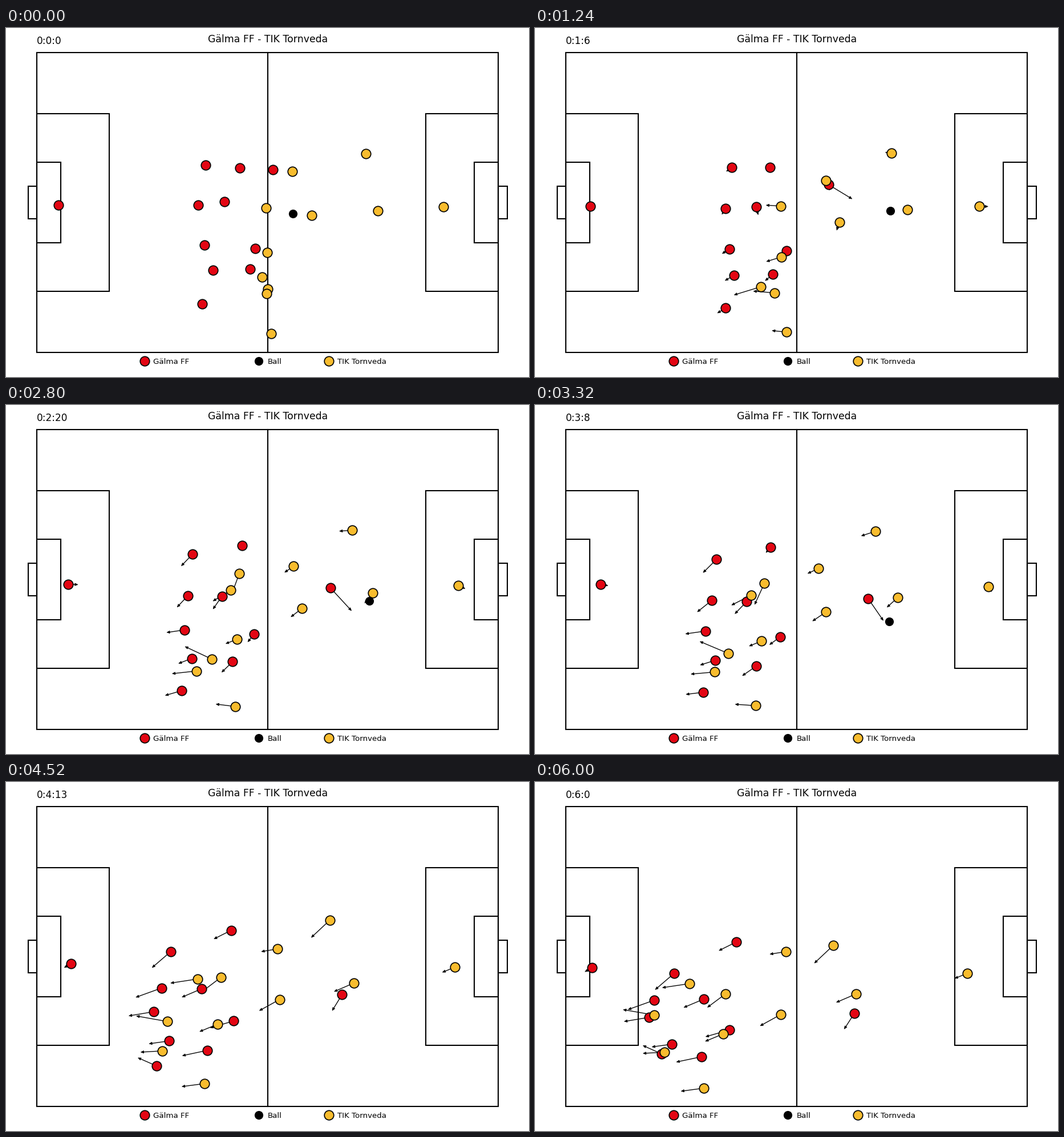
A matplotlib script that plays this animation: 917x611 px, repeating every 6.04 s.

```python
import numpy as np
import matplotlib.pyplot as plt
from matplotlib.animation import FuncAnimation
from matplotlib.collections import LineCollection, PolyCollection
from matplotlib.patches import Rectangle

W, H, DPI = 917, 611, 64
PX = 72 / DPI                      # one pixel in points
FPS, FRAMES = 25, 151
HEAD = 5.5                         # arrow head length
HOME, AWAY = "Gälma FF", "TIK Tornveda"
RED, GOLD = "#e30613", "#f8bc2e"

time = np.arange(FRAMES) / FPS
KEYS = np.array([0, 1.88, 3.8, 6])
squads = {HOME: [], AWAY: []}


def glide(points):
    """Smooth path through the points, one per key time."""
    p = np.array(points, float)
    k = KEYS[:len(p)]
    v = np.gradient(p, k, axis=0)
    i = np.clip(np.searchsorted(k, time, "right") - 1, 0, len(k) - 2)
    h = (k[i + 1] - k[i])[:, None]
    s = (time - k[i])[:, None] / h
    r = 1 - s
    return (r * r * ((1 + 2 * s) * p[i] + s * h * v[i])
            + s * s * ((1 + 2 * r) * p[i + 1] - r * h * v[i + 1]))


def walk(team, *points, seen=(0, 9)):
    pos = glide(points)
    vel = np.gradient(pos, time, axis=0)
    shown = (time >= seen[0]) & (time <= seen[1])
    squads[team].append((pos, vel, shown))
    return pos


walk(HOME, (92, 310), (100, 313), (117, 315), (100, 325))
walk(HOME, (350, 240), (340, 248), (308, 280), (244, 335))
walk(HOME, (410, 245), (413, 244), (409, 252), (353, 280))
walk(HOME, (468, 248), (537, 290), (592, 354), (560, 405))
walk(HOME, (337, 310), (330, 321), (298, 350), (209, 382))
walk(HOME, (383, 304), (387, 320), (362, 352), (296, 380))
walk(HOME, (348, 380), (333, 390), (284, 398), (200, 412))
walk(HOME, (437, 386), (440, 393), (421, 411), (341, 434))
walk(HOME, (363, 424), (341, 437), (305, 450), (240, 459))
walk(HOME, (428, 422), (410, 437), (377, 463), (292, 481))
walk(HOME, (344, 483), (326, 494), (283, 503), (222, 476))

walk(AWAY, (767, 313), (785, 313), (795, 320), (758, 335))
walk(AWAY, (631, 220), (620, 219), (587, 226), (523, 286))
walk(AWAY, (502, 251), (511, 274), (490, 289), (440, 297))
receiver = walk(AWAY, (652, 320), (651, 320), (628, 343), (563, 371))
walk(AWAY, (536, 328), (530, 346), (500, 369), (431, 407))
walk(AWAY, (459, 457), (412, 454), seen=(0, 0.64))
walk(AWAY, (451, 271), (421, 271), (394, 326), (334, 371), seen=(1.56, 9))
walk(AWAY, (456, 315), (417, 313), (364, 339), (271, 353))
walk(AWAY, (458, 393), (419, 405), (388, 417), (330, 441))
walk(AWAY, (449, 436), (370, 460), (298, 469), (227, 473))
walk(AWAY, (457, 465), (398, 460), (317, 427), (209, 408))
walk(AWAY, (465, 535), (427, 531), (372, 526), (296, 536))


def ball_path(start=(502.5, 324.5), feet=(-6, 14), exit=(555, 555),
              caught=1.55, kicked=3.24, crossed=3.8):
    """A pass, a short dribble, then a kick out over the touchline."""
    t = time[:, None]
    dribble = receiver + np.array(feet) * np.clip((t - caught) / 1.25, 0, 1)
    kick_spot = dribble[round(kicked * FPS)]
    passed = start + (receiver - start) * t / caught
    kick = kick_spot + (exit - kick_spot) * (t - kicked) / (crossed - kicked)
    return np.where(t < caught, passed, np.where(t < kicked, dribble, kick))


plt.rcParams["font.family"] = "DejaVu Sans"
fig = plt.figure(figsize=(W / DPI, H / DPI), dpi=DPI, facecolor="white")
ax = fig.add_axes([0, 0, 1, 1])
ax.set(xlim=(0, W), ylim=(H, 0))
ax.axis("off")

CX, CY = 458.75, 305.6             # centre spot
MX, MY = 7.709, 7.727              # pixels per metre
LINE = dict(color="black", lw=2.08 * PX)


def box(x0, x1, half):
    """Rectangle in metres from the centre spot."""
    ax.add_patch(Rectangle((CX + x0 * MX, CY - half * MY), (x1 - x0) * MX,
                           2 * half * MY, fill=False, **LINE))


def dots(color, size, z, x=(), y=()):
    return ax.plot(x, y, "o", ms=size * PX, mfc=color, mec="black",
                   mew=1.7 * PX, zorder=z)[0]


def label(x, y, text, size, ha="left"):
    return ax.text(x, y, text, fontsize=size * PX, ha=ha, va="baseline")


box(-52.5, 52.5, 34)
for side in (-1, 1):
    for depth, half in ((-16.5, 20.16), (-5.5, 9.16), (2, 3.66)):
        box(side * 52.5, side * (52.5 + depth), half)
ax.plot([CX, CX], [CY - 34 * MY, CY + 34 * MY], **LINE)

label(CX, 25, f"{HOME} - {AWAY}", 17.2, "center")
clock = label(54, 28, "", 16.9)
for x, name, color, size in ((243, HOME, RED, 16.5), (443, "Ball", "black", 13.5),
                             (566, AWAY, GOLD, 16.5)):
    dots(color, size, 3, [x], [583])
    label(x + 15.3, 588, name, 13.4)

shafts = ax.add_collection(LineCollection([], colors="black", lw=1.35 * PX, zorder=2.5))
heads = ax.add_collection(PolyCollection([], fc="black", ec="black", lw=0.8 * PX, zorder=2.5))
marks = {HOME: dots(RED, 16.5, 3), AWAY: dots(GOLD, 16.5, 4)}
ball = dots("black", 13.5, 5)
ball.set_clip_path(Rectangle((0, 0), W, 600, transform=ax.transData))
ball_pos = ball_path()


def arrow(p, v):
    """Shaft and head for a run of one second."""
    u = v / max(np.hypot(*v), 1e-6)
    n = np.array([-u[1], u[0]]) * 2.1
    end = p + v
    return [p, end], [end + n, end + u * (HEAD - 0.5), end - n]


def draw(i):
    clock.set_text(f"0:{i // FPS}:{i % FPS}")
    arrows = []
    for team, players in squads.items():
        active = [(pos[i], vel[i]) for pos, vel, shown in players if shown[i]]
        marks[team].set_data(*np.array([p for p, _ in active]).T)
        if i:
            arrows += [arrow(p, v) for p, v in active]
    shafts.set_segments([shaft for shaft, _ in arrows])
    heads.set_verts([head for _, head in arrows])
    ball.set_data(*ball_pos[i][:, None])
    return [clock, shafts, heads, ball, *marks.values()]


anim = FuncAnimation(fig, draw, frames=FRAMES, init_func=lambda: draw(0),
                     interval=1000 / FPS, repeat=True)
plt.show()
```
